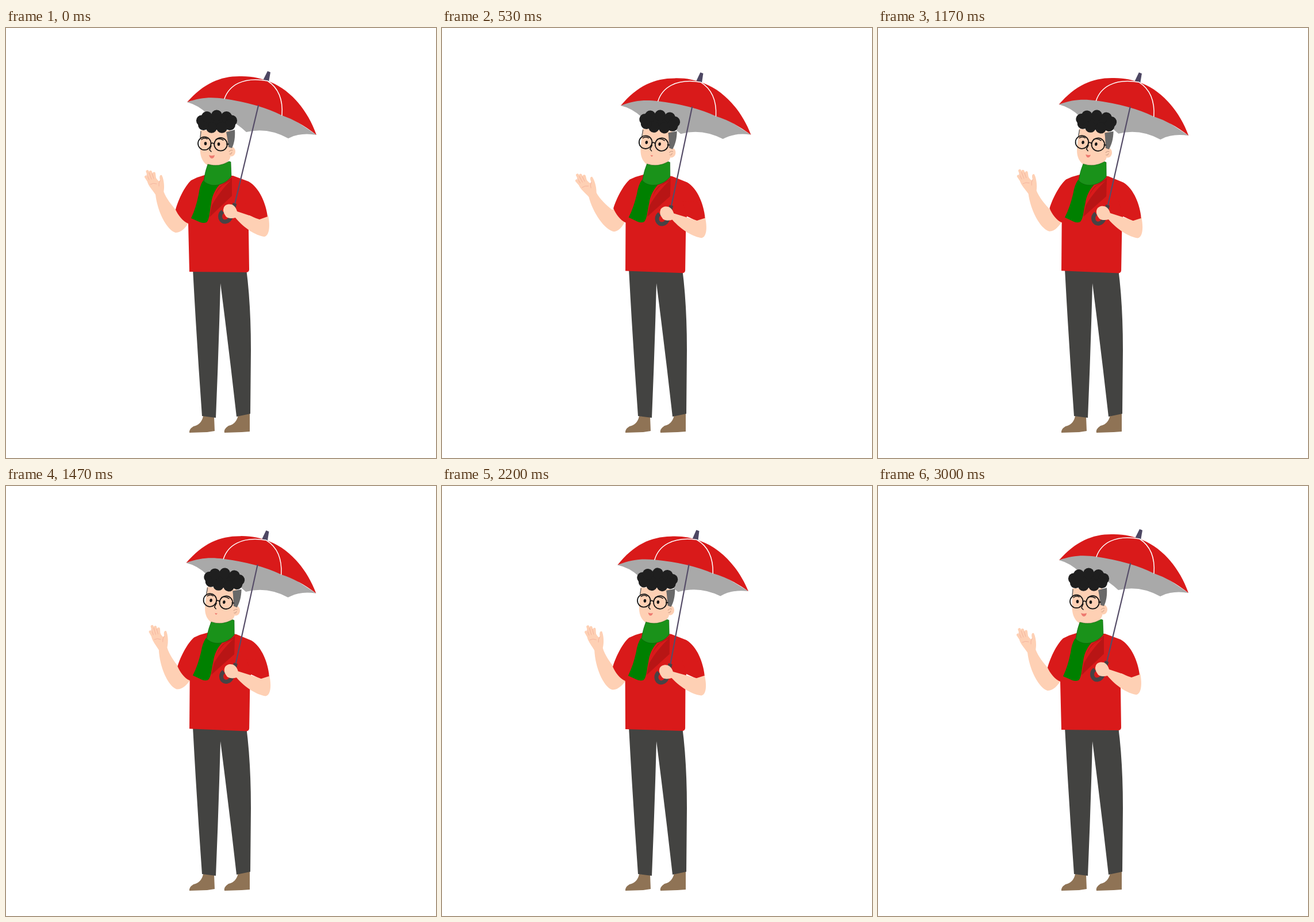
Animation, 748 px wide and 748 px high, one loop 3.03 s. Source, as an HTML page:

```html
<!DOCTYPE html>
<html lang="en">
<head>
<meta charset="utf-8">
<title>Man with umbrella</title>
<style>
html, body { margin: 0; width: 100%; height: 100%; overflow: hidden; background: #fff; }
svg { display: block; width: 100vw; height: 100vh; }
.line { fill: none; stroke-linecap: round; stroke-linejoin: round; }
.red { fill: #d91a1a; }
.skin { fill: #fed0b4; }
</style>
</head>
<body>
<svg viewBox="0 0 748 748">
  <!-- legs -->
  <g fill="#8f7355">
    <path d="M343 675L362 676L363 701L350 703L319 704Q318 698 326 693Q340 690 343 675Z"/>
    <path d="M404 673L424 670L424 702L410 703L380 704Q378 698 387 692Q401 689 404 673Z"/>
  </g>
  <path fill="#434341" d="M325 419L418 419Q426 480 426 560L425 671L401 676Q388 560 373 444Q370 560 365 678L341 675Q332 550 325 419Z"/>

  <g class="body">
    <!-- canopy -->
    <g class="hold">
      <path fill="#a9a9a9" d="M315 129Q335 134 352 151Q385 150 418 181Q455 172 491 192Q512 181 540 186L480 145L430 125L345 118Z"/>
      <path fill="#4d4763" d="M455 75L460 77L457 94L447 91Z"/>
      <path class="red" d="M315 129C345 95 375 83 410 84C430 84 445 88 460 94C495 108 525 143 540 186Q510 162 480 152Q440 132 380 123C358 120 340 120 315 129Z"/>
      <path class="line" stroke="#fff" stroke-width="1.5" d="M380 123C388 100 412 84 455 92C475 105 482 126 480 152"/>
    </g>

    <!-- raised arm -->
    <g class="wave">
      <path class="skin" d="M260 289C263 318 279 351 295 356C306 356 313 346 319 337L320 315L297 318C288 308 279 297 274 284Z"/>
      <path class="skin" d="M261 291C255 282 247 274 246 267L260 259C264 266 267 268 268 265C266 258 268 255 271 256C275 264 276 277 274 286Z"/>
      <path class="line" stroke="#fed0b4" stroke-width="5" d="M250 269L243.5 259M252 267L246 249.5M256 266L251.5 250.5M259 266L257.5 253"/>
      <path class="line" stroke="#f0a894" stroke-width=".7" d="M249 264L245 255M253 263L249 252M257 262L254 253M268 265Q265 270 266 275M251 272Q256 269 262 271"/>
    </g>

    <!-- torso -->
    <path class="red" d="M345 256L395 257L422 267C441 278 452 305 455 328L441 333L423 326L422 350L423 420Q423 424 419 425L319 424L317 340C308 337 299 325 295 316C300 298 311 275 322 265Q333 259 345 256Z"/>
    <path fill="#b81515" d="M372 276C362 288 358 305 354 329L393 292L393 260Z"/>
    <path class="red" d="M376 274C365 285 359 298 358 309C366 293 380 276 391 265Z"/>

    <!-- head -->
    <g class="head">
      <ellipse class="skin" cx="392" cy="215" rx="7" ry="8.5"/>
      <path class="skin" d="M338 178C338 195 337 207 338 217C340 234 351 242 363 242C376 242 386 235 390 226L393 205L390 178Z"/>
      <path class="line" stroke="#c99b85" d="M388 215Q392 211 394 213M389 219Q392 220 393 216"/>
      <path fill="#696969" d="M383 181L398 177C399 190 397 201 393 209L387 207Q385 190 383 181Z"/>
      <path class="line" stroke="#696969" stroke-width="1.5" d="M339 180L338 191"/>
      <g class="hair" fill="#1f1f1f"><ellipse cx="366.5" cy="163" rx="27" ry="14"/></g>
      <g class="line" stroke="#151515" stroke-width="1.8">
        <circle cx="345.3" cy="200.8" r="11.3"/>
        <circle cx="373.5" cy="202.3" r="11.3"/>
        <path d="M356.500 201Q359 199 362 201.500M384 202L387 202"/>
        <path stroke-width="1.5" d="M340 194Q345 190 350 193M365 194Q371 191 378 195M357 205L354 212L357 215"/>
      </g>
      <g fill="#151515">
        <ellipse cx="347" cy="201" rx="2.3" ry="3"/>
        <ellipse cx="370" cy="202" rx="2.3" ry="3"/>
      </g>
      <path class="mouth" fill="#ee7a70" d="M353 221Q358 223 363 221Q362 227 358 227Q355 227 353 221Z"/>
    </g>

    <!-- scarf -->
    <path fill="#008000" d="M343 265Q352 275 371 273C362 283 358 295 357 305C354 320 354 333 349 338Q344 340 338 338L322 331C328 318 332 305 335 290Q337 274 343 265Z"/>
    <path fill="#1a921a" stroke="#0b5c0b" stroke-width=".6" d="M351 237Q370 243 388 232L391 233L392 258C385 268 370 276 356 273Q348 271 344 266Q346 250 351 237Z"/>

    <!-- holding arm -->
    <g class="hold">
      <path class="line" stroke="#564d68" stroke-width="2.2" d="M439 135L398 306"/>
      <path fill="none" stroke="#474345" stroke-width="7" d="M398 305L392 326C389 339 376 340 373 331Q371 324 377 319"/>
      <path class="skin" d="M379 312C382 306 391 305 396 309Q400 312 402 319L441 332L456 326C460 345 458 362 449 363C435 361 415 349 399 330C393 332 384 331 382 327Q376 319 379 312Z"/>
    </g>
    <path class="red" d="M415 300L440 300L455 328L441 333Q430 330 422 324Z"/>
  </g>
</svg>
<script>
const LOOP = 3030, TAU = 2 * Math.PI;
const $ = name => document.querySelectorAll(name);

// a ring of equal curls around the crown
const curls = 9;
for (let i = 0; i < curls; i++) {
  const a = i / curls * TAU;
  $('.hair')[0].innerHTML +=
    `<circle cx="${366.5 + 26.5 * Math.sin(a)}" cy="${163 - 11 * Math.cos(a)}" r="9.5"/>`;
}

// smooth rise from 0 to 1 between two times
function ease(t, from, to) {
  const u = Math.min(1, Math.max(0, (t - from) / (to - from)));
  return u * u * (3 - 2 * u);
}

function turn(name, angle, x, y) {
  $(name).forEach(el => el.setAttribute('transform', `rotate(${angle} ${x} ${y})`));
}

function draw() {
  const t = performance.now() % LOOP;
  const sway = ease(t, 0, 640) - ease(t, 1630, 3000);
  const hold = -3.4 * ease(t, 0, 600) + 0.9 * ease(t, 600, 1200)
    - 1.6 * ease(t, 1200, 2150) + 4.1 * ease(t, 2150, 3000);
  const wave = -10.4 * ease(t, 0, 600) + 13 * ease(t, 600, 1650) - 2.6 * ease(t, 2300, 3000);
  const open = 0.72 + 0.28 * Math.cos(3 * t / LOOP * TAU);

  turn('.body', 1.8 * sway, 372, 424);
  turn('.head', 3.6 * sway, 372, 240);
  turn('.hold', hold, 448, 350);
  turn('.wave', wave, 298, 342);
  $('.mouth')[0].setAttribute('transform',
    `translate(358 223) scale(${open}) translate(-358 -223)`);
  requestAnimationFrame(draw);
}
draw();
</script>
</body>
</html>
```
